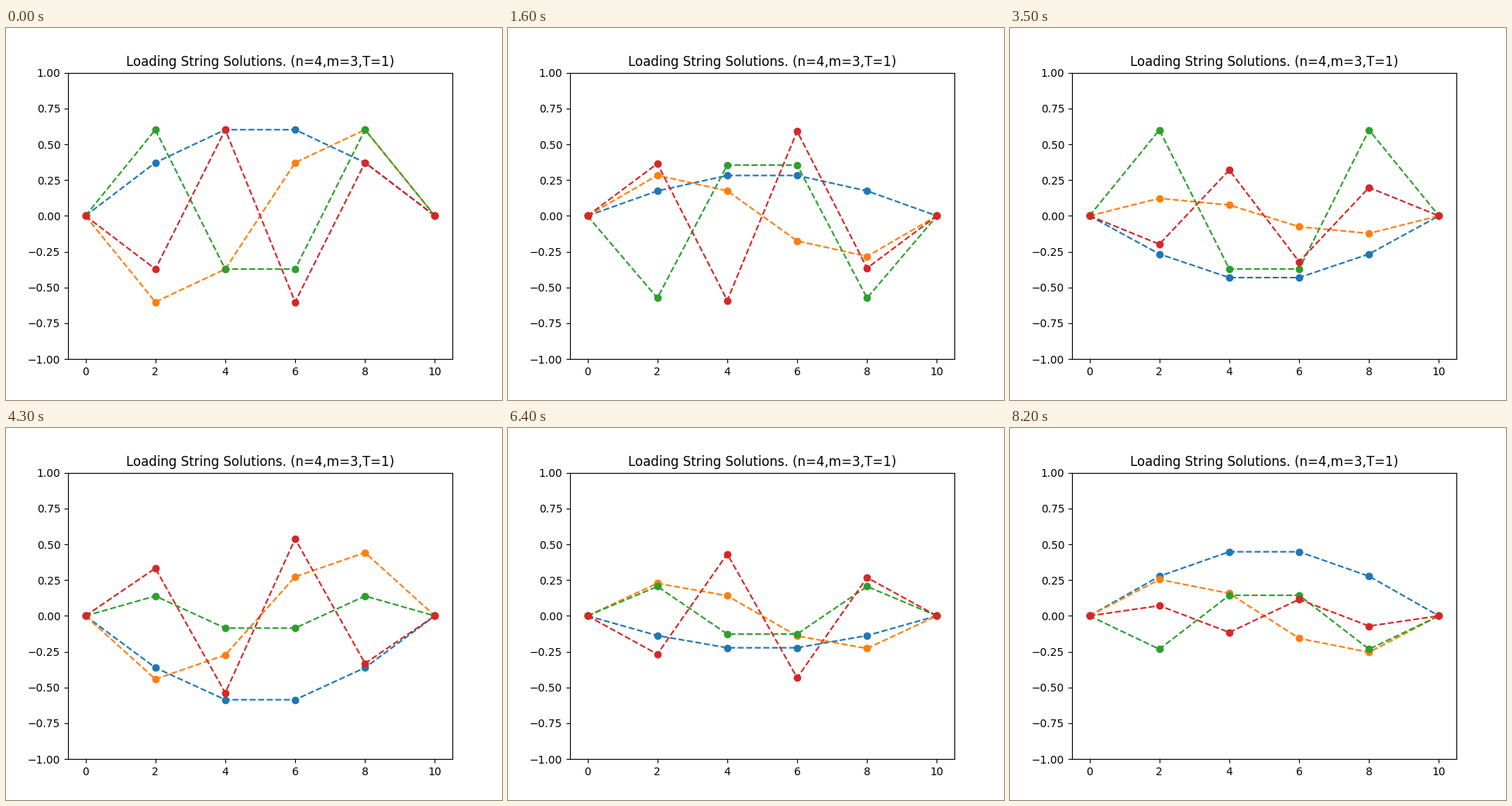
Write a matplotlib script that moves like this. It is 640x480 px and loops after 8300 ms.

```python
import numpy as np
import matplotlib.pyplot as plt
from matplotlib.animation import FuncAnimation

N, MASS, TENSION = 4, 3, 1
LENGTH = 10
FRAMES, INTERVAL = 83, 100
DT = 0.3

beads = np.arange(N + 2)
x = np.linspace(0, LENGTH, N + 2)
modes = np.arange(1, N + 1)

# Normal modes of the loaded string: one row of bead heights per mode
signs = np.array([1, -1, 1, -1])
shapes = np.sqrt(2 / (N + 1)) * np.sin(np.pi * np.outer(modes, beads) / (N + 1))
shapes *= signs[:, None]
omega = 2 * np.sqrt(TENSION / (MASS * LENGTH / N)) * np.sin(modes * np.pi / (2 * (N + 1)))

plt.rcParams["font.family"] = "DejaVu Sans"
fig, ax = plt.subplots(figsize=(6.4, 4.8), dpi=100)
ax.set_xlim(-0.5, 10.5)
ax.set_ylim(-1, 1)
ax.set_title(f"Loading String Solutions. (n={N},m={MASS},T={TENSION})")
lines = [ax.plot(x, y, "o--")[0] for y in shapes]


def update(frame):
    swing = np.cos(omega * frame * DT)
    for line, shape, s in zip(lines, shapes, swing):
        line.set_ydata(shape * s)
    return lines


anim = FuncAnimation(fig, update, frames=FRAMES, interval=INTERVAL, repeat=True)
plt.show()
```
